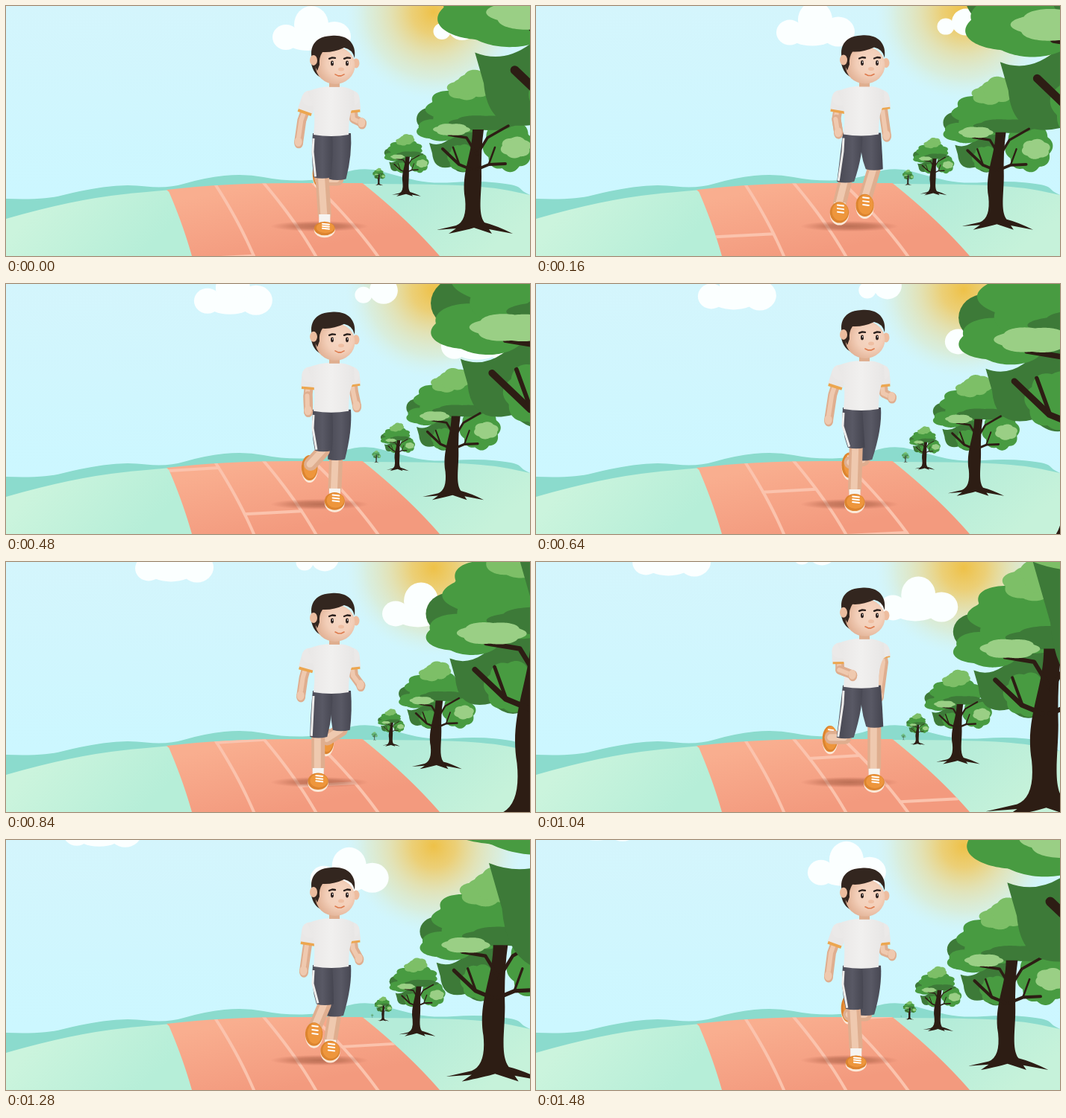
Recreate the animation shown at these times as an HTML page with a canvas. Size 702 by 336 pixels, loop 1520 ms.

```html
<!DOCTYPE html>
<html lang="en">
<head>
<meta charset="utf-8">
<title>Runner in the park</title>
<style>
html, body { margin: 0; width: 100%; height: 100%; overflow: hidden; background: #d0f6fd; }
canvas { display: block; }
</style>
</head>
<body>
<canvas id="stage" width="702" height="336"></canvas>
<script>
const ctx = document.getElementById('stage').getContext('2d');
const LOOP = 1520, STEP = 40, STRIDE = LOOP / 2;
const SKIN = '#efc9af', SHADE = '#dfae8f', ORANGE = '#ee963c', SOCK = '#f6f4f1';
const lerp = (a, b, p) => a + (b - a) * p;
const mix = (a, b, p) => a.map((v, i) => lerp(v, b[i], p));
// Periodic motion that peaks when the phase reaches `peak`
const wave = (phase, peak) => Math.cos(2 * Math.PI * (phase - peak));
const pulse = (phase, peak, power) => ((1 + wave(phase, peak)) / 2) ** power;

function fill(color) { ctx.fillStyle = color; ctx.fill(); }

function ellipse(color, x, y, rx, ry) {
  ctx.beginPath();
  ctx.ellipse(x, y, rx, ry, 0, 0, 7);
  fill(color);
}

function line(color, width, points, cap = 'round') {
  ctx.beginPath();
  points.forEach(p => ctx.lineTo(...p));
  ctx.strokeStyle = color;
  ctx.lineWidth = width;
  ctx.lineCap = cap;
  ctx.lineJoin = 'round';
  ctx.stroke();
}

function shape(color, path) { fillPath(color, new Path2D(path)); }
function fillPath(color, path) { ctx.fillStyle = color; ctx.fill(path); }

// Smooth ridge from left to right, filled down to the bottom
function ridge(color, points) {
  ctx.beginPath();
  ctx.moveTo(...points[0]);
  for (let i = 1; i < points.length - 1; i++)
    ctx.quadraticCurveTo(...points[i], ...mix(points[i], points[i + 1], .5));
  const [x, y] = points[points.length - 1];
  ctx.lineTo(x, y);
  ctx.lineTo(x, 336);
  ctx.lineTo(points[0][0], 336);
  fill(color);
}

function spread(g, colors) {
  colors.forEach((c, i) => g.addColorStop(i / (colors.length - 1), c));
  return g;
}
const gradient = (x0, y0, x1, y1, ...colors) => spread(ctx.createLinearGradient(x0, y0, x1, y1), colors);
const glow = (x, y, r, ...colors) => spread(ctx.createRadialGradient(x, y, 0, x, y, r), colors);

const skyFill = gradient(0, 0, 0, 250, '#d4f5fc', '#ccf7ff');
const sunFill = glow(573, 8, 118, '#eec148', 'rgba(239,202,100,.88)', 'rgba(234,216,145,.65)',
  'rgba(226,226,175,.4)', 'rgba(215,240,225,0)');
const leftGrass = gradient(60, 250, 170, 350, '#cbf4dd', '#b6eed8');
const rightGrass = gradient(560, 240, 640, 336, '#b5ecd9', '#c6f2da');
const trackFill = gradient(340, 238, 360, 336, '#f9ae8f', '#f39a7e');
const shadowFill = glow(0, 0, 66, 'rgba(150,80,55,.6)', 'rgba(160,85,60,.45)', 'rgba(180,90,70,0)');

function sky() {
  ctx.fillStyle = skyFill;
  ctx.fillRect(0, 0, 702, 336);
  ctx.fillStyle = sunFill;
  ctx.fillRect(450, 0, 252, 130);
}

function cloud(x, y) {
  ellipse('#fbffff', x + 18, y + 42, 18, 17);
  ellipse('#fbffff', x + 52, y + 25, 23, 25);
  ellipse('#fbffff', x + 83, y + 41, 22, 20);
  ellipse('#fbffff', x + 48, y + 46, 30, 14);
}

function clouds(t) {
  const dx = -.219 * t, dy = -.04 * t;
  cloud(357 + dx, dy);
  cloud(688 + dx, 61 + dy);
  ellipse('#fbffff', 584 + dx, 34 + dy, 11.5, 11);
  ellipse('#fbffff', 611 + dx, 28 + dy, 19, 18);
}

function hills() {
  ridge('#8bdbcd', [[0, 259], [50, 261], [100, 248], [160, 239], [215, 246], [265, 231], [320, 225],
    [370, 235], [425, 234], [478, 215], [530, 230], [570, 239], [630, 235], [684, 240], [692, 249], [702, 254]]);
  ridge(leftGrass, [[0, 286], [90, 260], [225, 246], [260, 245]]);
  ridge(rightGrass, [[478, 239], [560, 239], [650, 243], [702, 254]]);
}

// Border between lanes: straight fan plus a bulge to the right
function lanePoint(i, y) {
  const u = (y - 240) / 96;
  return [lerp(214 + 66.5 * i, 249 + 83 * i, u) + (8 + 2.5 * i) * u * (1 - u), y];
}
function border(i) {
  const points = [];
  for (let y = 238; y <= 340; y += 6) points.push(lanePoint(i, y));
  return points;
}

function track(t) {
  const paint = '#fbc3ad';
  ctx.save();
  ctx.beginPath();
  ctx.moveTo(215, 247);
  ctx.quadraticCurveTo(300, 237, 400, 238);
  border(4).forEach(p => ctx.lineTo(...p));
  border(0).slice(2).reverse().forEach(p => ctx.lineTo(...p));
  ctx.closePath();
  fill(trackFill);
  ctx.clip();
  for (let i = 1; i < 4; i++) line(paint, 4, border(i));
  for (let i = 0; i < 4; i++) {
    const y = 336 - .185 * (t - 10 - 315 * i);
    if (y < 340 && y > 234) line(paint, 4, [lanePoint(i, y + 2), lanePoint(i + 1, y - 2)]);
  }
  ctx.restore();
}

// Leaf mass: ellipse with a scalloped rim
function leaves(color, x, y, rx, ry, lobes = 7) {
  ctx.beginPath();
  for (let a = 0; a < 6.28; a += .04) {
    const r = .92 + .12 * Math.abs(Math.sin(a * lobes / 2 + x));
    ctx.lineTo(x + rx * r * Math.cos(a), y + ry * r * Math.sin(a));
  }
  fill(color);
}

const TRUNK = `M-2-138C-2-105-18-80-12-45Q-9-15-24-9L-50-3-24-5-34 2Q-10-3 0-6
  L24 2 20-4 52 2Q30-9 14-13C5-25 10-50 10-75Q9-110 13-138Z`;

function tree([x, y, height, alpha]) {
  const light = '#7dbf67', pale = '#9acf85', green = '#489b41', dark = '#3d7a38', bark = '#2d1d14';
  ctx.save();
  ctx.globalAlpha = alpha;
  ctx.translate(x, y);
  ctx.scale(height / 216, height / 216);
  shape(dark, 'M-60-120Q-40-112-22-138L8-138Q12-100-6-83Q-18-76-30-88Q-54-82-56-106Z');
  leaves(green, -16, -100, 19, 18);
  leaves(green, 46, -116, 33, 34, 8);
  leaves(pale, 56, -114, 20, 14, 6);
  ellipse(dark, -60, -152, 17, 15);
  leaves(green, -46, -138, 31, 15, 5);
  leaves(green, -3, -166, 60, 31, 9);
  leaves(dark, 14, -147, 46, 10, 6);
  leaves(light, -12, -192, 24, 14, 6);
  leaves(light, 4, -200, 25, 18, 6);
  shape(bark, TRUNK);
  for (const side of [-1, 1]) {
    line(bark, 4, [[side * 3, -84], [side * 20, -91], [side * 42, -102 + side * 10]]);
    line(bark, 3.5, [[4, -104], [4 + side * 14, -127], [6 + side * 40, -137 - side * 6]]);
    line(bark, 2.5, [[side * 20, -92], [side * 28, -114]]);
  }
  leaves(pale, -30, -138, 24, 8, 6);
  ctx.restore();
}

// Places a tree passes, one per loop: x, ground y, height, opacity
const PLACES = [[1469, 1308, 2600, 1], [806, 418, 640, 1], [627, 304, 216, 1],
  [536, 255, 82, 1], [499.5, 241, 23, 1], [489, 238.5, 2, .2]];
function trees(t) {
  for (let i = 4; i >= 0; i--) tree(mix(PLACES[i], PLACES[i + 1], t / LOOP));
}

function limb(points, width) {
  line(SHADE, width, points);
  line(SKIN, width * .5, points.map(([x, y]) => [x - 1, y]));
}

function shoe(x, y, w, h) {
  ellipse('#fbe9d8', x, y + 1, w / 2, h / 2);
  ellipse('#dc842f', x, y - 1, w / 2, h / 2 - 1);
  ellipse(ORANGE, x + 1, y - 2, w / 2 - 2, h / 2 - 3);
  for (let i = 0; i < 3; i++) {
    const ly = y - h * (.36 - .15 * i);
    line('#fff', 2, [[x - w * .1, ly], [x + w * .22, ly + 1]]);
  }
}

// Both legs share one cycle, half a stride apart
function leg(phase, hipX, dy) {
  const lift = pulse(phase, .48, 1.5);
  const hem = [hipX - 3 + 8 * wave(phase, .8), 236 - 18 * pulse(phase, .77, 2)];
  const foot = [hipX - 13 + 18 * wave(phase, .92), 300 - 74 * lift];
  const ankle = [foot[0] + 2 * lift, foot[1] - 20 * (1 - lift)];
  const drawShoe = () => shoe(...foot, 28 - 9 * lift, 20 + 19 * Math.sqrt(lift));
  const behind = lift > .7;
  if (behind) drawShoe();
  limb([hem, [ankle[0], Math.max(ankle[1], hem[1])]], 18);
  if (!behind) {
    line(SOCK, 15, [ankle, mix(ankle, foot, .6)], 'butt');
    drawShoe();
  }
  shorts(hem, hipX, 178 + dy);
  return hem;
}

function shorts([x, y], hipX, hipY) {
  ctx.beginPath();
  ctx.moveTo(hipX - 13, hipY - 8);
  ctx.lineTo(hipX + 13, hipY - 8);
  ctx.quadraticCurveTo(hipX + 15, hipY + 20, x + 12, y);
  ctx.quadraticCurveTo(x, y + 3, x - 11, y);
  ctx.quadraticCurveTo(hipX - 16, hipY + 20, hipX - 13, hipY - 8);
  fill(gradient(hipX - 15, 0, hipX + 15, 0, '#4c4c57', '#595965', '#454550'));
}

function sleeve(shoulder, elbow) {
  line('#eca64f', 19, [shoulder, mix(shoulder, elbow, .7)], 'butt');
  line('#e9e7e6', 21, [shoulder, mix(shoulder, elbow, .58)], 'butt');
  ellipse('#ebe9e8', ...shoulder, 10.5, 10.5);
}

function arm(shoulder, elbow, hand) {
  limb([shoulder, elbow, hand], 12);
  ellipse(SHADE, hand[0], hand[1] + 1, 6, 7.5);
  ellipse(SKIN, hand[0] - .5, hand[1] - .5, 5, 6.5);
}

function head() {
  const hair = '#33261f';
  line(SHADE, 14, [[440, 96], [440, 108]], 'butt');
  ellipse('#eebd9f', 469, 76, 4.5, 6.5);
  shape(hair, 'M408 70Q410 90 422 95L432 70Z');
  ellipse(glow(447, 76, 34, '#f6d8c5', '#f3cfb9', '#dfad90'), 441, 79, 26.5, 25);
  shape(hair, `M414 80C404 62 408 40 436 39C456 37 470 48 467 69
    Q464 57 453 55Q438 62 424 61Q419 68 420 78L417 86Z`);
  ellipse('#ecbd9f', 412, 72, 5, 7);
  for (const x of [437, 457]) {
    line('#2a201d', 2.3, [[x - 4, 70], [x, 68.5], [x + 4, 69]]);
    ellipse('#2c2220', x, 76, 2, 3.4);
    ellipse('#fff', x + .6, 75, .7, .9);
  }
  ellipse('#efbfa3', 449, 84, 4, 2.5);
  line('#dd7a4c', 1.6, [[441, 91], [445, 93], [449, 93], [453, 91]]);
}

function runner(t) {
  const phase = t % STRIDE / STRIDE;
  const dy = -1.5 + 2.5 * wave(2 * phase, .2) + 2 * wave(phase, .1);
  const swing = pulse(phase, .42, 2);
  const leftShoulder = [407, 123 + dy], rightShoulder = [463, 123 + dy];
  const leftElbow = [402 + 6 * wave(phase, .45), 153 + dy - 4 * swing];
  const rightElbow = [466, 151 + dy - 13 * swing];
  const leftHand = [392 + 34 * swing, 183 - 33 * swing];
  const rightHand = [477 - 18 * swing, 166 - 14 * wave(phase, .86)];

  ctx.save();
  ctx.translate(420, 296);
  ctx.scale(1, .11);
  ellipse(shadowFill, 0, 0, 66, 66);
  ctx.restore();

  arm(rightShoulder, rightElbow, rightHand);
  leg(phase + .5, 449, dy);
  const hem = leg(phase, 424, dy);
  line('#eeedeb', 3, [[412, 177 + dy], [411, 195 + dy], [hem[0] - 9, hem[1] - 1]], 'butt');

  sleeve(rightShoulder, rightElbow);
  arm(leftShoulder, leftElbow, leftHand);
  sleeve(leftShoulder, leftElbow);
  ctx.save();
  ctx.translate(0, dy);
  shape(gradient(405, 0, 466, 0, '#e9e7e6', '#f1f0ef', '#e8e6e5'),
    `M404 114Q420 107 436 107Q454 106 466 113L467 132Q459 140 459 172Q436 176 412 172Q415 146 411 132Z`);
  head();
  ctx.restore();
  if (swing > .3) arm(leftElbow, leftElbow, leftHand);
}

function draw(now) {
  const t = Math.floor(now % LOOP / STEP) * STEP;
  sky();
  clouds(t);
  hills();
  track(t);
  trees(t);
  runner(t);
}

const start = performance.now();
function frame() {
  draw(performance.now() - start);
  requestAnimationFrame(frame);
}
frame();
</script>
</body>
</html>
```
